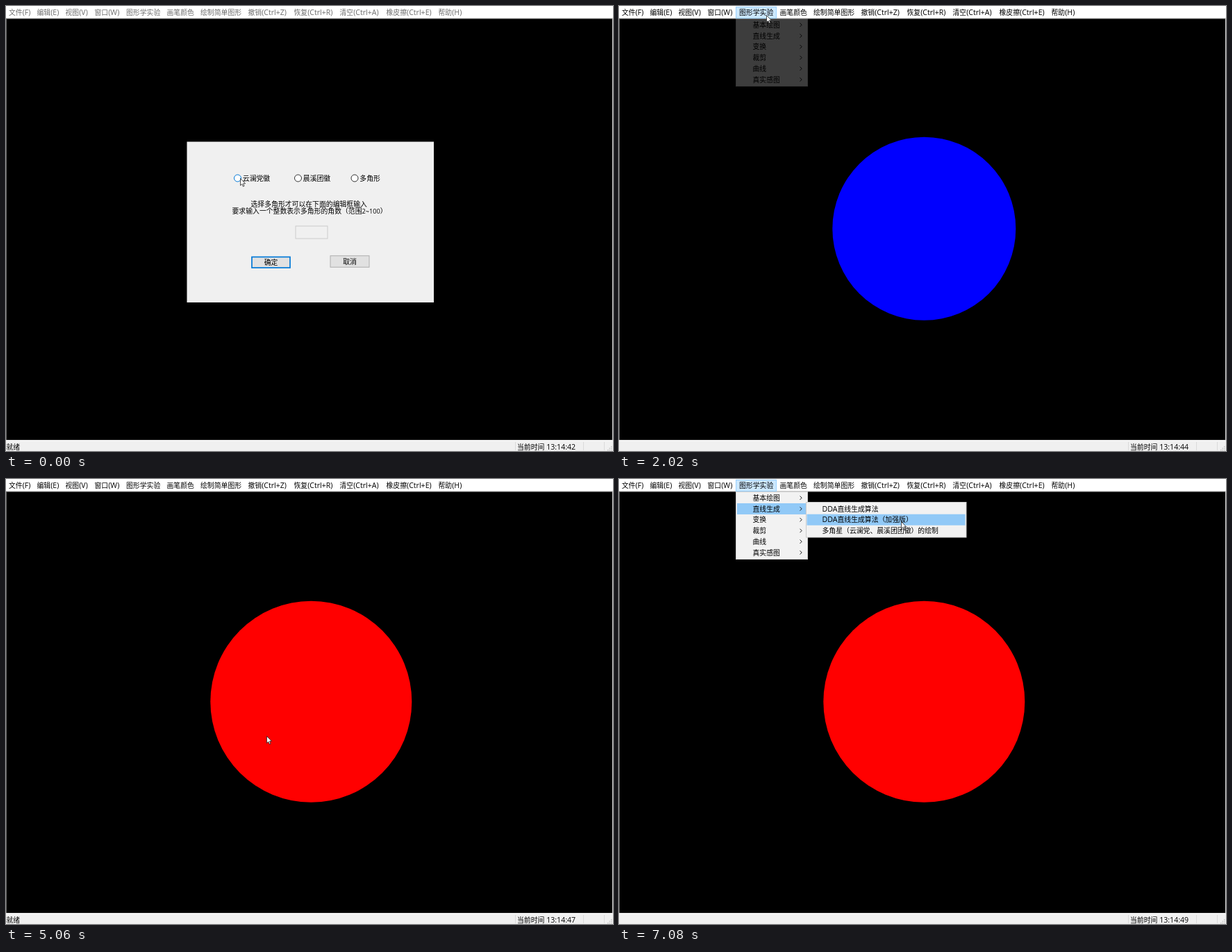
An HTML page for the animation above (8 s loop, 874 by 641 pixels).

```html
<!DOCTYPE html>
<html lang="zh-CN">
<head>
<meta charset="utf-8">
<title>图形学实验</title>
<style>
  html, body { margin: 0; width: 100%; height: 100%; overflow: hidden; background: #000; }
  svg { display: block; width: 874px; height: 641px; }
  text { font-family: "Open Sans", "Noto Sans CJK SC", "Noto Sans CJK", sans-serif; font-size: 9.85px; white-space: pre; }
</style>
</head>
<body>
<svg id="stage" viewBox="0 0 874 641"></svg>
<script>
const LOOP = 8000;
const BLUE_DISC = { r: 132, fill: '#00f' };
const RED_DISC = { r: 145, fill: '#f00' };

// Each scene holds until the next one starts.
const scenes = [
  { at: 0, clock: 42, ready: true, dialog: { hover: 0 }, cursor: [337, 248] },
  { at: 1010, clock: 43, ready: true, dialog: { picked: 0, okHover: true }, cursor: [383, 370] },
  { at: 2020, clock: 44, disc: BLUE_DISC, menu: { opacity: 0.25 }, cursor: [212, 13] },
  { at: 3040, clock: 45, disc: BLUE_DISC, menu: { active: 1, sub: 0 }, cursor: [281, 45] },
  { at: 4040, clock: 46, ready: true, disc: BLUE_DISC, dialog: {}, cursor: [415, 260] },
  { at: 5060, clock: 47, ready: true, disc: RED_DISC, cursor: [375, 370] },
  { at: 6080, clock: 48, disc: RED_DISC, menu: { active: 0 }, cursor: [215, 24] },
  { at: 7080, clock: 49, disc: RED_DISC, menu: { active: 1, sub: 1 }, cursor: [406, 61] }
];

const menuBar = [
  [4, '文件(F)'], [44.5, '编辑(E)'], [85.5, '视图(V)'], [127.5, '窗口(W)'],
  [173, '图形学实验'], [231.5, '画笔颜色'], [280, '绘制简单图形'], [348.5, '撤销(Ctrl+Z)'],
  [414.5, '恢复(Ctrl+R)'], [480.5, '清空(Ctrl+A)'], [547.5, '橡皮擦(Ctrl+E)'], [622.5, '帮助(H)']
];
const menuItems = ['基本绘图', '直线生成', '变换', '裁剪', '曲线', '真实感图'];
const subItems = ['DDA直线生成算法', 'DDA直线生成算法（加强版）', '多角星（云澜党、晨溪团团徽）的绘制'];
const radios = [[333.5, '云澜党徽'], [420.5, '晨溪团徽'], [502, '多角形']];

const rect = (x, y, w, h, fill, stroke = 'none', line = 1) =>
  `<rect x="${x}" y="${y}" width="${w}" height="${h}" fill="${fill}" stroke="${stroke}" stroke-width="${line}"/>`;

const circle = (x, y, r, fill, stroke = 'none') =>
  `<circle cx="${x}" cy="${y}" r="${r}" fill="${fill}" stroke="${stroke}"/>`;

// Places text by its vertical middle; Latin runs have their own size.
function label(x, middle, text, { fill = '#000', anchor = 'start', latin = 10.6 } = {}) {
  const runs = text.replace(/[ -~]+/g, `<tspan font-size="${latin}px">$&</tspan>`);
  return `<text x="${x}" y="${middle + 3.6}" fill="${fill}" text-anchor="${anchor}">${runs}</text>`;
}

function drawWindow({ clock, ready, dialog, menu }) {
  const fill = dialog ? '#6d6d6d' : '#000';
  // Menu bar, sunken edge of the canvas, status bar.
  let out = rect(0, 0, 874, 18, '#fff') + rect(0, 17.5, 874, 0.7, '#a0a0a0') +
    rect(0, 18.2, 873, 0.8, '#696969') + rect(0, 18, 1, 607, '#696969') +
    rect(873, 18, 1, 607, '#e3e3e3') + rect(0, 625, 874, 16, '#f0f0f0') +
    rect(0, 625, 874, 1, '#e3e3e3') + rect(0, 626, 874, 0.6, '#fff');
  if (menu) out += rect(168.5, 1.5, 58, 16, '#cce8ff', '#99d1ff');
  out += menuBar.map(([x, text]) => label(x, 9.5, text, { fill })).join('');
  out += [733, 831, 861].map(x => rect(x, 628, 1, 12, '#dadada')).join('');
  for (let row = 0; row < 3; row++)
    for (let col = 0; col <= row; col++)
      out += rect(871 - col * 2.5, 634 + row * 2.5, 1.4, 1.4, '#bfbfbf');
  if (ready) out += label(0.5, 635, '就绪');
  return out + label(736, 635, '当前时间 13:14:' + clock);
}

function drawMenu({ active, sub, opacity = 1 }) {
  const rowY = i => 27.2 + i * 15.75;
  let out = rect(168.5, 18.5, 103, 97, '#f2f2f2', '#ccc');
  if (active !== undefined) out += rect(170, rowY(active) - 8, 100, 16, '#91c9f7');
  menuItems.forEach((text, i) => {
    const y = rowY(i);
    out += label(192.5, y, text) +
      `<path d="M260.5 ${y - 2.7}l2.7 2.7l-2.7 2.7" fill="none" stroke="#222"/>`;
  });
  if (sub !== undefined) {
    out += rect(269.5, 33.5, 230.5, 50.5, '#f2f2f2', '#ccc') +
      rect(270.5, rowY(sub + 1) - 8, 228, 16, '#91c9f7');
    out += subItems.map((text, i) => label(292.5, rowY(i + 1), text)).join('');
  }
  return `<g opacity="${opacity}">${out}</g>`;
}

function drawDialog({ hover, picked, okHover }) {
  let out = rect(260.5, 195.5, 355.5, 231.5, '#f0f0f0');
  radios.forEach(([x, text], i) => {
    out += circle(x, 248, 5, '#fff', i === hover ? '#0078d7' : '#333');
    if (i === picked) out += circle(x, 248, 2.6, '#222');
    out += label(x + 7.3, 248, text);
  });
  return out +
    label(352.5, 285, '选择多角形才可以在下面的编辑框输入') +
    label(325.5, 295.5, '要求输入一个整数表示多角形的角数（范围2~100）', { latin: 9.2 }) +
    rect(417, 317, 46, 18, '#f0f0f0', '#ccc') +
    rect(354, 361.5, 55, 15.5, okHover ? '#e5f1fb' : '#e1e1e1', '#0078d7', 1.7) +
    label(381.5, 369.2, '确定', { anchor: 'middle' }) +
    rect(467, 359.8, 56, 16.4, '#e1e1e1', '#adadad') +
    label(495, 368, '取消', { anchor: 'middle' });
}

const drawCursor = ([x, y]) =>
  `<path transform="translate(${x} ${y})" d="M.5 .5V10.5L2.8 8.4L4.4 12L6 11.3L4.5 7.8H7.6Z"
    fill="#fff" stroke="#222" stroke-width=".8"/>`;

function render(scene) {
  const { disc, menu, dialog, cursor } = scene;
  return rect(0, 0, 874, 641, '#000') +
    (disc ? circle(439.3, 320.8, disc.r, disc.fill) : '') +
    drawWindow(scene) +
    (menu ? drawMenu(menu) : '') +
    (dialog ? drawDialog(dialog) : '') +
    drawCursor(cursor);
}

const stage = document.getElementById('stage');
const start = performance.now();
let shown;

function tick() {
  const time = (performance.now() - start) % LOOP;
  const scene = scenes.filter(s => s.at <= time).pop();
  if (scene !== shown) {
    stage.innerHTML = render(scene);
    shown = scene;
  }
  requestAnimationFrame(tick);
}
tick();
</script>
</body>
</html>
```
